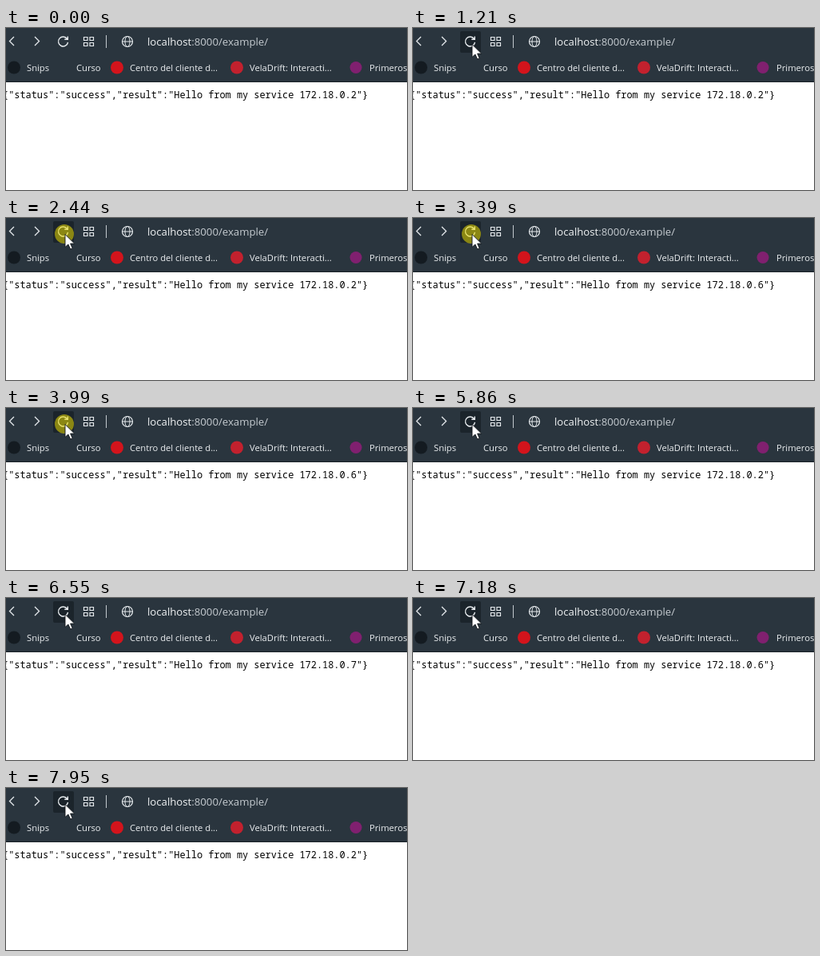
An HTML page for the animation above (8 s loop, 502 px wide and 203 px high).

```html
<!DOCTYPE html>
<html lang="es">
<head>
<meta charset="utf-8">
<title>Service reload</title>
<style>
  html, body { margin: 0; width: 100%; height: 100%; overflow: hidden; background: #fff; }
  svg { display: block; width: 502px; height: 203px; }
  text { white-space: pre; }
  .line { fill: none; stroke: #e6eaed; stroke-width: 1.2; }
  .url { font: 13.2px "Open Sans", "Noto Sans", sans-serif; fill: #f4f6f7; }
  .url .rest { fill: #c6ccd1; }
  .mark { font: 11.2px "Open Sans", "Noto Sans", sans-serif; fill: #eceff1; }
  .json { font: 11.91px "Noto Sans Mono", "DejaVu Sans Mono", monospace; fill: #000; }
</style>
</head>
<body>
<svg viewBox="0 0 502 203">
  <rect width="502" height="203" fill="#fff"/>
  <rect width="502" height="68" fill="#2a353e"/>
  <rect y="67" width="502" height="1" fill="#182026"/>
  <rect id="hover" x="59" y="4" width="26" height="27" rx="2" fill="#1b242b"/>

  <g class="line">
    <path d="M10 11L4.500 16.500L10 22M36 11L41.500 16.500L36 22" stroke-width="1.300"/>
    <path d="M76.500 13.600A6 6 0 1 0 77.500 17.800M77.300 10.500V14.300H73.300" stroke-width="1.400"/>
    <path d="M97.500 11.500h4.500v4h-4.500zM105 11.500h4.500v4h-4.500zM97.500 18.500h4.500v4h-4.500zM105 18.500h4.500v4h-4.500z"/>
    <path d="M125.500 9V25" stroke="#c3c9ce" stroke-width="1"/>
    <circle cx="152" cy="17" r="6.500"/>
    <ellipse cx="152" cy="17" rx="3" ry="6.500" stroke-width="1"/>
    <path d="M145.500 17H158.500" stroke-width="1"/>
  </g>

  <text class="url" x="177" y="21.500">localhost<tspan class="rest">:8000/example/</tspan></text>

  <circle cx="10" cy="49.500" r="8" fill="#141b21"/>
  <circle cx="139" cy="49.500" r="8" fill="#d3141c"/>
  <circle cx="289" cy="49.500" r="8" fill="#c2212e"/>
  <circle cx="438" cy="49.500" r="7.500" fill="#80206f"/>
  <g class="mark">
    <text x="26" y="53.500">Snips</text>
    <text x="88" y="53.500">Curso</text>
    <text x="155" y="53.500">Centro del cliente d...</text>
    <text x="305" y="53.500">VelaDrift: Interacti...</text>
    <text x="455" y="53.500">Primeros</text>
  </g>

  <text id="json" class="json" x="-4" y="88"></text>

  <circle id="glow" cx="73" cy="20" r="12" fill="#e8d800" opacity=".55"/>
  <path id="cursor" d="M0 .5V16.500L3.900 13L6.600 19L9.200 17.900L6.600 12.100H11.700Z" fill="#fff" stroke="#10161a" stroke-width=".9"/>
</svg>
<script>
  const LOOP = 8000;
  const $ = id => document.getElementById(id);

  // Button toggles: down, up, down, up ...
  const clicks = [
    1440, 1600, 2440, 2610, 3160, 3240, 3390, 3470, 3540, 3610, 3690, 3760,
    3990, 4070, 4300, 4450, 4850, 5000, 5310, 5480,
    5630, 5710, 5780, 5860, 5940, 6020, 6090, 6170, 6250, 6330, 6400, 6550,
    6630, 6710, 6780, 6860, 6940, 7020, 7090, 7170, 7250, 7330,
    7410, 7480, 7560, 7640, 7720, 7790, 7870, 7950
  ];

  // Last digit of the answering host; 0 is an empty page while loading
  const replies = [
    [0, 2], [2610, 0], [2680, 7], [3240, 0], [3310, 6], [3610, 2], [3760, 6],
    [4150, 7], [5000, 2], [5480, 6], [5710, 7], [5860, 2], [6020, 6], [6170, 2],
    [6330, 7], [6710, 6], [6860, 0], [6940, 2], [7170, 6], [7330, 7],
    [7480, 2], [7640, 6], [7790, 7], [7950, 2]
  ];

  const show = (el, on) => el.setAttribute("visibility", on ? "visible" : "hidden");
  const ease = p => p * p * (3 - 2 * p);

  // The pointer is sampled in 76 ms steps on its way to the button
  function pointer(t) {
    if (t >= 1210) return [74, 20];
    const p = ease(Math.min(10, Math.floor((t - 380) / 76)) / 10);
    return [Math.round(357 - 284 * p), Math.round(173 - 153 * p)];
  }

  let last = -1;
  function draw(t) {
    const [x, y] = pointer(t);
    const seen = t >= 380;
    show($("cursor"), seen);
    $("cursor").setAttribute("transform", `translate(${x} ${y})`);
    show($("hover"), seen && x < 85 && y < 31);
    show($("glow"), clicks.filter(c => c <= t).length % 2);

    const digit = replies.filter(r => r[0] <= t).pop()[1];
    if (digit !== last) {
      $("json").textContent = digit
        ? `{"status":"success","result":"Hello from my service 172.18.0.${digit}"}`
        : "";
      last = digit;
    }
  }

  const start = performance.now();
  function tick() {
    draw((performance.now() - start) % LOOP);
    requestAnimationFrame(tick);
  }
  tick();
</script>
</body>
</html>
```
